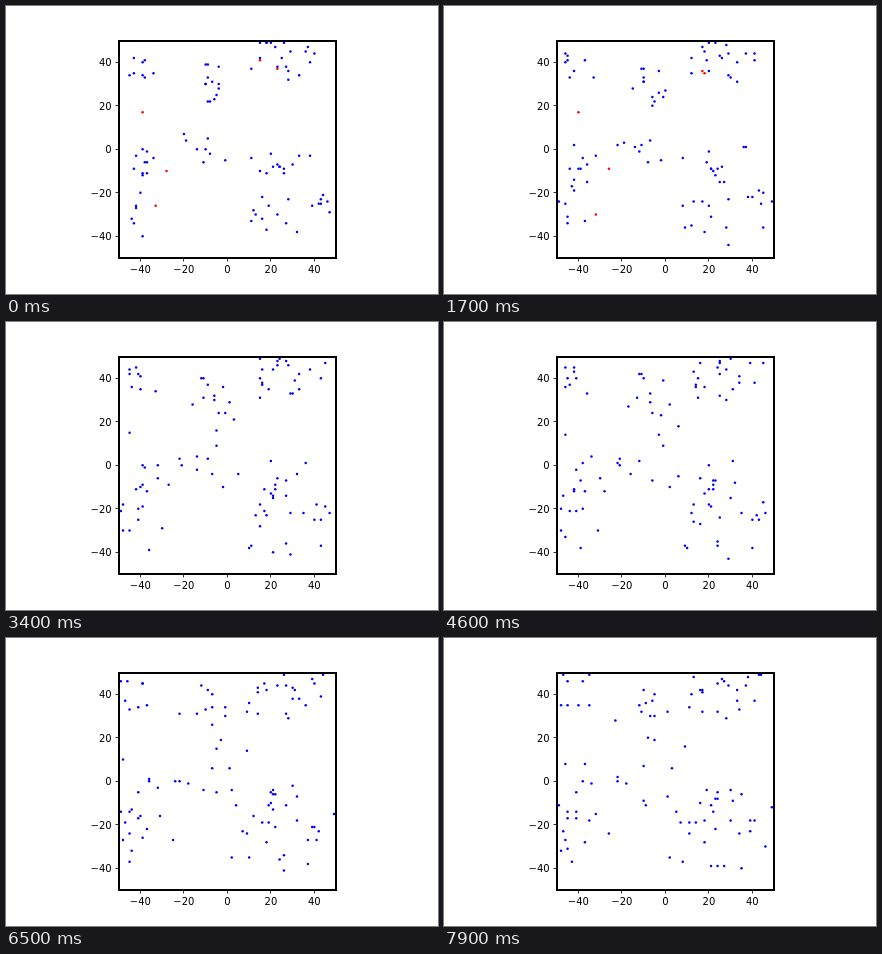
Recreate the animation shown at these times as an HTML page. Size 432 by 288 pixels, loop 8 s.

```html
<!DOCTYPE html>
<html lang="en">
<head>
<meta charset="utf-8">
<title>Random walkers</title>
<style>
  html, body { margin: 0; width: 100%; height: 100%; overflow: hidden; background: #fff; }
  svg { display: block; }
  text { font: 10px "DejaVu Sans", sans-serif; }
</style>
</head>
<body>
<svg width="432" height="288" viewBox="0 0 432 288">
  <g id="dots"></g>
  <g id="axes"></g>
  <rect x="113" y="35" width="217" height="217" fill="none" stroke="#000" stroke-width="2"/>
</svg>
<script>
const STEP_MS = 100, STEPS = 80, LIMIT = 49, SCALE = 2.1744;
const toX = v => 221.4 + v * SCALE;
const toY = v => 143.28 - v * SCALE;

// Loose groups in which the blue walkers start.
const groups = [
  { x: -39, y: 35, spreadX: 9, spreadY: 9, count: 8 },
  { x: -8, y: 30, spreadX: 7, spreadY: 18, count: 13 },
  { x: 26, y: 43, spreadX: 19, spreadY: 13, count: 19 },
  { x: -39, y: -5, spreadX: 6, spreadY: 9, count: 9 },
  { x: -13, y: -1, spreadX: 15, spreadY: 9, count: 8 },
  { x: 22, y: -9, spreadX: 20, spreadY: 9, count: 13 },
  { x: 18, y: -32, spreadX: 18, spreadY: 15, count: 11 },
  { x: 42, y: -27, spreadX: 6, spreadY: 6, count: 7 },
  { x: -41, y: -27, spreadX: 7, spreadY: 18, count: 7 }
];
const redStarts = [[-39, 17], [-28, -10], [-33, -26], [15, 41], [23, 37]];

let seed = 20;
function random() {
  seed = (seed * 1664525 + 1013904223) % 4294967296;
  return seed / 4294967296;
}

const clamp = v => Math.max(-LIMIT, Math.min(LIMIT, v));
const scatter = (center, spread) =>
  clamp(Math.round(center + spread * (random() + random() - 1)));

// One unit along one axis per step, kept inside the box.
function walk(x, y) {
  const path = [[x, y]];
  while (path.length < STEPS) {
    const move = random() < 0.5 ? -1 : 1;
    if (random() < 0.5) x = clamp(x + move);
    else y = clamp(y + move);
    path.push([x, y]);
  }
  return path;
}

function add(parent, tag, attributes, content = "") {
  const node = document.createElementNS("http://www.w3.org/2000/svg", tag);
  for (const name in attributes) node.setAttribute(name, attributes[name]);
  node.textContent = content;
  return parent.appendChild(node);
}

const axes = document.getElementById("axes");
const snap = v => Math.round(v - 0.5) + 0.5;
for (let v = -40; v <= 40; v += 20) {
  const label = String(v).replace("-", "\u2212");
  const x = snap(toX(v)), y = snap(toY(v));
  add(axes, "path", { d: `M${x} 252v3.5M113 ${y}h-3.5`, stroke: "#000", "stroke-width": 0.8 });
  add(axes, "text", { x: toX(v), y: 267, "text-anchor": "middle" }, label);
  add(axes, "text", { x: 105.7, y: Math.round(toY(v) + 3.8), "text-anchor": "end" }, label);
}

const dots = document.getElementById("dots");
const walkers = [];
function addWalker(x, y, isRed = false) {
  const node = add(dots, "circle", { r: 1.25, fill: "#00f" });
  walkers.push({ node, path: walk(x, y), isRed });
}
for (const { x, y, spreadX, spreadY, count } of groups) {
  for (let i = 0; i < count; i++) addWalker(scatter(x, spreadX), scatter(y, spreadY));
}
for (const [x, y] of redStarts) addWalker(x, y, true);

// Red walkers fade into the blue ones after the opening.
const RED_STEPS = 18;

let shown = -1;
function draw(time) {
  const step = Math.floor(time / STEP_MS) % STEPS;
  if (step === shown) return;
  shown = step;
  for (const { node, path, isRed } of walkers) {
    const [x, y] = path[step];
    node.setAttribute("cx", toX(x));
    node.setAttribute("cy", toY(y));
    if (isRed) node.setAttribute("fill", step < RED_STEPS ? "#f00" : "#2000c8");
  }
}

const began = performance.now();
function tick() {
  draw(performance.now() - began);
  requestAnimationFrame(tick);
}
draw(0);
requestAnimationFrame(tick);
</script>
</body>
</html>
```
